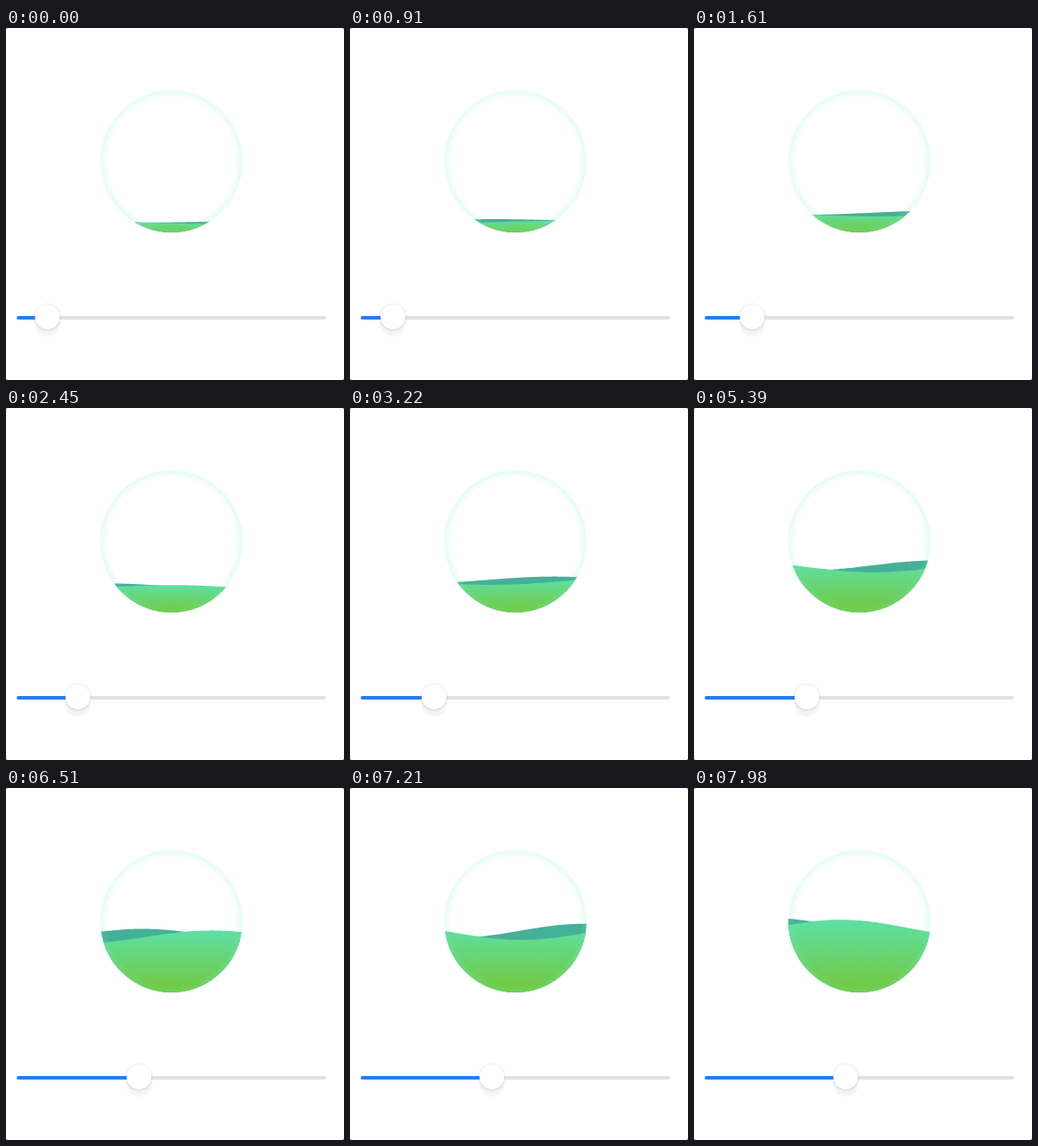
These frames come from a looping animation (380x396 px, 8 s). An HTML page:

```html
<!DOCTYPE html>
<html lang="en">
<head>
<meta charset="utf-8">
<title>Liquid level slider</title>
<style>
  html, body { margin: 0; width: 100%; height: 100%; overflow: hidden; background: #555; }
  #stage { position: relative; width: 380px; height: 396px; background: #fff; border-radius: 2px; overflow: hidden; }
  #stage > * { position: absolute; }
  svg { left: 0; top: 0; }
  .ring {
    left: 106px; top: 70px; width: 160px; height: 160px; border-radius: 50%;
    box-shadow: inset 0 0 5px 4px rgba(110, 245, 190, .2);
  }
  .track, #fill { left: 12px; top: 324px; height: 4px; border-radius: 2px; }
  .track { width: 348px; background: #e3e3e3; }
  #fill { background: #267cf8; }
  #knob {
    left: -14px; top: 310.5px; width: 28px; height: 28px; border-radius: 50%; background: #fff;
    box-shadow: 0 0.5px 3px rgba(0, 0, 0, .2), 0 8px 2px rgba(0, 0, 0, .045);
  }
</style>
</head>
<body>
<div id="stage">
  <svg width="380" height="396">
    <defs>
      <clipPath id="bowl"><circle cx="186" cy="150" r="80"/></clipPath>
      <linearGradient id="liquid" gradientUnits="userSpaceOnUse" x1="0" x2="0" y1="150" y2="230">
        <stop offset="0" stop-color="#5ee0a4"/>
        <stop offset="1" stop-color="#74c73c"/>
      </linearGradient>
    </defs>
    <g clip-path="url(#bowl)">
      <path id="back" fill="#45b098"/>
      <path id="front" fill="url(#liquid)"/>
    </g>
  </svg>
  <div class="ring"></div>
  <div class="track"></div>
  <div id="fill"></div>
  <div id="knob"></div>
</div>
<script>
  const LOOP = 8000, STEP = 70;
  const WAVELENGTH = 300, SPEED = 0.159;
  const $ = id => document.getElementById(id);

  // Dragged knob: [time in ms, x]
  const drag = [
    [0, 46.5], [840, 46.5], [1610, 65.5], [2520, 82], [3220, 94.5], [3360, 94.5],
    [4200, 108.5], [4270, 110.5], [5040, 123], [5390, 127], [6510, 149.5], [7980, 170.5]
  ];

  function knobAt(t) {
    const i = drag.findIndex(([time]) => time > t);
    if (i < 0) return drag[drag.length - 1][1];
    const [t0, x0] = drag[i - 1], [t1, x1] = drag[i];
    return x0 + (x1 - x0) * (t - t0) / (t1 - t0);
  }

  function wave(level, amplitude, crest) {
    let d = 'M104 232';
    for (let x = 104; x <= 268; x += 2) {
      const y = level - amplitude * Math.cos(2 * Math.PI * (x - crest) / WAVELENGTH);
      d += `L${x} ${y.toFixed(2)}`;
    }
    return d + 'L268 232Z';
  }

  function draw(now) {
    const t = Math.floor(now % LOOP / STEP) * STEP;
    const x = knobAt(t);
    const p = (x - 26) / 320;
    const level = 229.5 - 160 * p;
    const amplitude = 0.6 + 11 * p + 17 * p * p;
    const crest = 96 + SPEED * t;

    $('back').setAttribute('d', wave(level - 1.9, amplitude, crest - 78));
    $('front').setAttribute('d', wave(level, amplitude, crest));
    $('liquid').setAttribute('y1', level - amplitude);
    $('fill').style.width = x - 12 + 'px';
    $('knob').style.transform = `translateX(${x}px)`;
  }

  const start = performance.now();
  function tick() {
    draw(performance.now() - start);
    requestAnimationFrame(tick);
  }
  tick();
</script>
</body>
</html>
```
